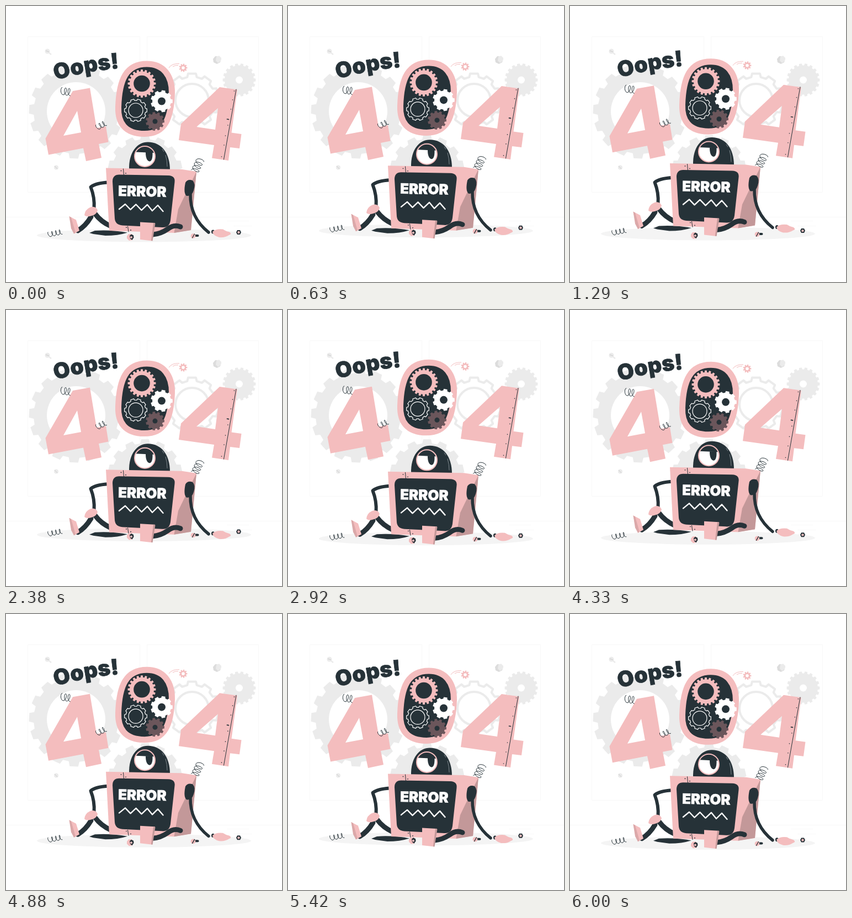
Write an HTML page that moves like this. It is 500 px wide and 500 px high and loops after 6040 ms.

```html
<!DOCTYPE html>
<html lang="en">
<head>
<meta charset="utf-8">
<title>404</title>
<style>
html, body { margin: 0; height: 100%; overflow: hidden; background: #fff; }
svg { display: block; width: 100vw; height: 100vh; }
text { font-family: Inter, "Open Sans", sans-serif; font-weight: 900; }
.dark { fill: #263238; }
.pink { fill: #f4bdbe; }
.shade { fill: #c39899; }
.grey { fill: #ebebeb; }
.white { fill: #fff; }
.plum { fill: #6b565b; }
.line { fill: none; stroke: #263238; stroke-linecap: round; stroke-linejoin: round; }
.wire { fill: none; stroke: #fff; }
.pale { fill: none; stroke: #ebebeb; }
.faint { fill: none; stroke: #f8f8f8; }
</style>
</head>
<body>
<svg viewBox="0 0 500 500">
  <g id="back">
    <path class="faint" d="M39.5 55.5h203v282h-203zM255.500 55.500h202v282h-202zM0 382.500H500M400 389.500h40M412 398.500h34"/>
    <circle class="grey" cx="75" cy="82" r="4.500"/>
    <path class="pale" stroke-width="2.500" d="M77 84l5 4"/>
    <path fill="#dcdcdc" d="M375 96l4-5 7 0 4 4-2 7-6 3-6-3z"/>
    <path class="grey" d="M381 92l5-2 4 4-1 6-5 3-4-4z"/>
    <circle class="grey" cx="91" cy="292.500" r="4"/>
    <path stroke="#ccc" d="M72 81l6 2M88 290l5 5"/>
  </g>

  <g id="floor">
    <ellipse cx="250" cy="415.500" rx="194" ry="12" fill="#f4f4f4"/>
  </g>

  <g id="letters">
    <path id="arc" fill="none" d="M90 134.500Q148 117 216 112"/>
    <text class="dark" font-size="39" stroke="#263238" stroke-width=".7"><textPath href="#arc">Oops!</textPath></text>
    <path class="pink" fill-rule="evenodd" d="M121 154L152 148.500 164 221 181 218 185.500 246.500 168 250 173 275 145 281 140 257.500 77 269.500 71.500 240zM129 190L104 235 136 229z"/>
    <path class="dark" stroke="#f4bdbe" stroke-width="11" d="M255 105C285 105 301 126 300.500 158C299 204 288 231.500 251 231.500C215 231.500 202.500 211 203.500 183C205 133 218 105 255 105Z"/>
    <path class="pink" fill-rule="evenodd" d="M387 147L419 151.500 408.500 229.500 426.500 232 423 258 406 256 403 280 373 275.500 377 252 313 243 317 213.500zM384 185L345 219 379 224z"/>
    <path class="line" d="M417 151L394.500 278"/>
    <path class="line" stroke-width="1.600" d="M413.500 154v0M410.500 170v0M407.500 187v0M400.500 205l3 .5M402 216v0M397.500 235v0M395 252v0M390.500 273v0"/>
    <path fill="none" stroke="#f4bdbe" d="M295 112Q300 104 314 104.500M302 110Q306 107 312 107.500"/>
  </g>

  <g id="robot">
    <path class="dark" d="M151 411L161 407Q190 405 220 410.500Q203 416 180 416L158 413Z"/>
    <path class="line" stroke-width="6" d="M184 319.500Q162 321 153.500 328Q161 347 159.500 367"/>
    <path class="line" stroke-width="9" d="M161 376Q172 391 190 399M130 407Q144 399 154 382"/>
    <path class="pink" d="M114.500 381L127 387.500 133 407 123 412.500 119 402z"/>
    <path fill="#dba8a9" d="M114.500 381L118 383 126 411 123 412.500 118 403z"/>
    <path class="pink" d="M142 379Q143 369 152 365Q162 361 166 370Q164 378 155 380Q146 383 142 379Z"/>

    <path class="dark" d="M223 297C222 264 238 246.500 257 246.500C282 246.500 297 267 297 297Z"/>
    <path fill="none" stroke="#7d878c" d="M283 259l3 5M289 270Q292 280 292 291"/>
    <circle class="white" cx="251.500" cy="272.500" r="18.500"/>
    <path class="dark" d="M253 265H265.500Q266 281 260 281.500Q253 280 253 265Z"/>
    <path class="dark" d="M234.500 264.500L269 266A18.500 18.500 0 0 0 234.500 264.500Z"/>
    <circle cx="251.500" cy="272.500" r="18.500" fill="none" stroke="#f4bdbe" stroke-width="2"/>

    <path class="pink" d="M181 293.500L319 296 345 300 335 406 304 411 187 407z"/>
    <path class="shade" d="M345 300L335 406 304.500 411 312 368z"/>
    <path class="line" d="M212.500 295l1 12M220.500 399l1.500 10"/>
    <path class="line" stroke-width="1.800" d="M208.500 298.500v0M217 303v0M218 401v0M226 406v0"/>
    <path class="dark" d="M205 305.500L294 307Q307 307.500 305.500 319L298 388Q296 402 283 401L211 397.500Q198 396.500 197 385L193 318Q193 305.500 205 305.500Z"/>
    <text class="white" font-size="25.800" stroke="#fff" stroke-width=".6" transform="translate(203 344) rotate(1.200)">ERROR</text>
    <path class="wire" stroke-width="2.400" stroke-linecap="round" stroke-linejoin="round" d="M205 368L216 359 225.500 369 235.500 359.500 245.500 370 256 360 265 371 275 361 284.500 372"/>

    <path class="line" stroke-width="9" stroke-linecap="butt" d="M316 400Q304 395 293 404Q280 413 266 414"/>
    <path class="pink" d="M243 391.500L270 393 265 425.500 243 423z"/>
    <path class="shade" d="M267 393L270.500 394 265.500 425.500 263 425z"/>
    <path class="dark" d="M325 320Q329 313 338 316Q344 322 340 334Q337 345 327 344Q321 339 325 320Z"/>
    <path class="line" stroke-width="5.500" d="M334 340Q333 383 367 410"/>
    <ellipse class="dark" cx="375" cy="409" rx="3" ry="3.500"/>
    <path class="pink" d="M374 409Q380 403 393 404.500Q398 408 405 409.500Q410 413 404 415Q397 420 386 419Q375 416 374 409Z"/>
  </g>

  <g id="bits">
    <path class="pink" d="M219 417l3-4 6 0 3 5-2 6-6 1-4-4z"/>
    <path class="dark" d="M224 416l3-2.500 4 2 .5 4-3 4.500-3.500-2.500z"/>
    <circle class="pink" cx="227" cy="419" r="2"/>
    <path class="line" stroke-width="4" d="M342 416h5.500"/>
    <circle class="pink" cx="339" cy="416.500" r="4.300"/>
    <path class="line" stroke-width="1.300" d="M337.500 420l4-7"/>
    <path class="dark" d="M417 410l2-4h5l2 4-2 4h-5z"/>
    <circle class="pink" cx="421.500" cy="410" r="2.200"/>
  </g>
</svg>
<script>
const LOOP = 6040, LIFT = 10;
const $ = id => document.getElementById(id);

function draw(parent, tag, attrs) {
  const el = document.createElementNS('http://www.w3.org/2000/svg', tag);
  for (const k in attrs) el.setAttribute(k, attrs[k]);
  parent.append(el);
}

function gear(parent, cls, x, y, outer, root, teeth, hole, holeCls, width = 1, turn = 0) {
  const step = 2 * Math.PI / teeth, pts = [];
  for (let i = 0; i < teeth; i++) {
    for (const [part, r] of [[-.32, root], [-.23, outer], [.23, outer], [.32, root]]) {
      const a = (i + part + turn) * step;
      pts.push((x + r * Math.cos(a)).toFixed(2) + ' ' + (y + r * Math.sin(a)).toFixed(2));
    }
  }
  draw(parent, 'path', { class: cls, d: 'M' + pts.join('L') + 'Z', 'stroke-width': width, 'stroke-linejoin': 'round' });
  draw(parent, 'circle', { class: holeCls, cx: x, cy: y, r: hole, 'stroke-width': width });
}

// A loose coil from one end to the other.
function spring(parent, x1, y1, x2, y2, r, loops) {
  const len = Math.hypot(x2 - x1, y2 - y1), ux = (x2 - x1) / len, uy = (y2 - y1) / len, pts = [];
  for (let i = 0; i <= loops * 16; i++) {
    const a = i / 16 * 2 * Math.PI;
    const u = len * i / (loops * 16) - r * .5 * Math.sin(a), v = -r * Math.cos(a);
    pts.push((x1 + u * ux - v * uy).toFixed(2) + ' ' + (y1 + u * uy + v * ux).toFixed(2));
  }
  draw(parent, 'path', { class: 'line', d: 'M' + pts.join('L') });
}

const back = $('back'), letters = $('letters'), robot = $('robot'), bits = $('bits');

gear(back, 'grey', 127, 191, 85.5, 77, 16, 53, 'white', 1, .12);
gear(back, 'grey', 252, 302, 68, 61, 14, 20, 'grey', 1, .5);
gear(back, 'pale', 337, 171, 49, 43, 10, 30, 'pale', 4, .5);
gear(back, 'grey', 422.5, 134, 30, 26.5, 18, 6.5, 'white');

gear(letters, 'pink', 246, 140.5, 25.5, 22, 20, 14.8, 'dark');
gear(letters, 'wire', 235, 189, 20.5, 18, 10, 13, 'wire', 1.2);
gear(letters, 'plum', 270, 209, 17, 14, 11, 4.5, 'dark');
gear(letters, 'white', 282, 172.5, 20, 17, 9, 7, 'dark');
gear(letters, 'pink', 321, 112, 7.5, 5.5, 9, 2.8, 'white');
spring(letters, 101, 154, 117, 156, 6.5, 2.5);
spring(letters, 165, 220, 180, 212, 5, 2.5);
spring(robot, 352, 279, 342, 300, 7, 3.5);
spring(bits, 77, 414, 101, 409, 4.5, 3.5);

const floats = [[letters, LOOP], [robot, LOOP / 2], [bits, LOOP / 4], [$('floor'), LOOP / 4]];
const start = performance.now();

function frame() {
  const t = (performance.now() - start) % LOOP;
  for (const [group, period] of floats) {
    const p = t % period / period;
    const y = -LIFT * (1 - Math.abs(2 * p - 1));
    group.setAttribute('transform', `translate(0 ${y.toFixed(3)})`);
  }
  requestAnimationFrame(frame);
}
frame();
</script>
</body>
</html>
```
